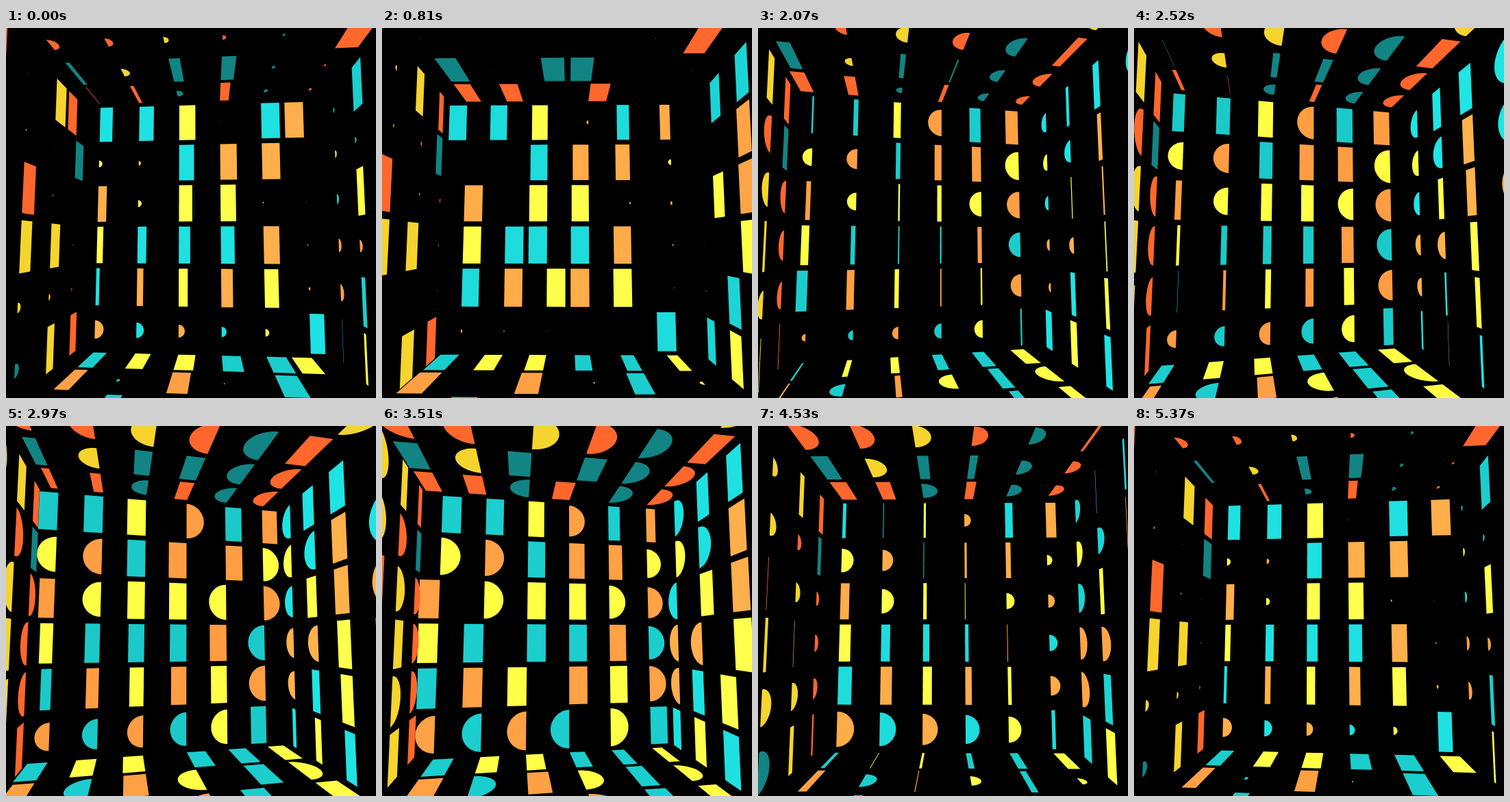
Animation, 540 px wide and 540 px high, one loop 5400 ms. Source, as an HTML page with a canvas:

```html
<!DOCTYPE html>
<html lang="en">
<head>
<meta charset="utf-8">
<title>Room of flipping tiles</title>
<style>
  html, body { margin: 0; height: 100%; overflow: hidden; background: #000; }
  canvas { display: block; width: 540px; height: 540px; }
</style>
</head>
<body>
<canvas id="stage" width="540" height="540"></canvas>
<script>
const ctx = document.getElementById('stage').getContext('2d');
const { sin, cos, abs, max, floor, PI } = Math;

const LOOP = 5400, STEP = 30;
const FOCAL = 467.65, CAMERA = FOCAL / 100;   // lengths are in tile pitches
const TILT = PI / 36;
const HALF = 0.44;                            // half a tile
const COLOURS = { c: [18, 132, 132], o: [255, 103, 44], y: [245, 212, 45] };

// Upper case: rectangle, lower case: half disc, dot: always out of view.
const WALLS = [
  { at: (x, y) => [x, y, -3], normal: [0, 0, 1],
    rows: ['CCYoCO', 'yoCOOy', 'OyYYyo', 'YCCCOc', 'COYOYo', 'ococyC'] },
  { at: (x, y) => [x, -3.01, -y], normal: [0, 1, 0],
    rows: ['......', '......', '.....y', 'ooyocO', 'CyCCco', 'OOcOco'] },
  { at: (x, y) => [x, 3.01, y], normal: [0, -1, 0],
    rows: ['CYYCCY', 'OcOyCy', 'oCyoCY', '......', '......', '......'] },
  { at: (x, y) => [-2.88, y, -x], normal: [1, 0, 0],
    rows: ['..OyYO', '...yoC', '...Oyo', '...YYo', '...yyo', '...cYO'] },
  { at: (x, y) => [3.02, y, x], normal: [-1, 0, 0],
    rows: ['cCCc..', 'ycOc..', 'cYOo..', 'ooYO..', 'oCY...', 'CYC...'] }
];

function rotate([x, y, z], yaw) {
  const depth = x * sin(yaw) + z * cos(yaw);
  return [
    x * cos(yaw) - z * sin(yaw),
    y * cos(TILT) - depth * sin(TILT),
    y * sin(TILT) + depth * cos(TILT)
  ];
}

function project(point, yaw) {
  const [x, y, z] = rotate(point, yaw);
  const scale = FOCAL / (CAMERA - z);
  return [270 + x * scale, 270 + y * scale];
}

// Outline around the hinge of a tile, in wall units.
function outline(isRect, angle) {
  const side = sin(angle) < 0 ? 1 : -1;
  if (isRect) {
    const w = side * HALF * abs(cos(angle));
    return [[0, -HALF], [w, -HALF], [w, HALF], [0, HALF]];
  }
  const r = HALF * (1 - cos(angle)) / 2;
  return Array.from({ length: 25 }, (_, i) => {
    const a = PI * (i / 24 - 0.5);
    return [side * r * cos(a), r * sin(a)];
  });
}

function shade(rgb, normal, yaw) {
  const [x, y, z] = rotate(normal, yaw);
  const light = 1 + 0.61 * max(0, z - x - y);
  return `rgb(${rgb.map(v => Math.min(255, Math.round(v * light))).join()})`;
}

function draw(t) {
  const yaw = (8 * cos(2 * PI * t) - 4) * PI / 180;
  ctx.fillStyle = '#000';
  ctx.fillRect(0, 0, 540, 540);
  for (const { at, normal, rows } of WALLS) {
    rows.forEach((row, r) => [...row].forEach((cell, c) => {
      if (cell === '.') return;
      const key = cell.toLowerCase();
      const angle = 2 * PI * t - PI * (5 - c + r) / 20;
      ctx.fillStyle = shade(COLOURS[key], normal, yaw);
      ctx.beginPath();
      for (const [x, y] of outline(cell !== key, angle)) {
        ctx.lineTo(...project(at(c - 2.5 + x, r - 2.5 + y), yaw));
      }
      ctx.fill();
    }));
  }
}

// Steps count from one, so the loop ends exactly on a full turn.
function tick() {
  const step = floor(performance.now() % LOOP / STEP) + 1;
  draw(step * STEP / LOOP);
  requestAnimationFrame(tick);
}
tick();
</script>
</body>
</html>
```
